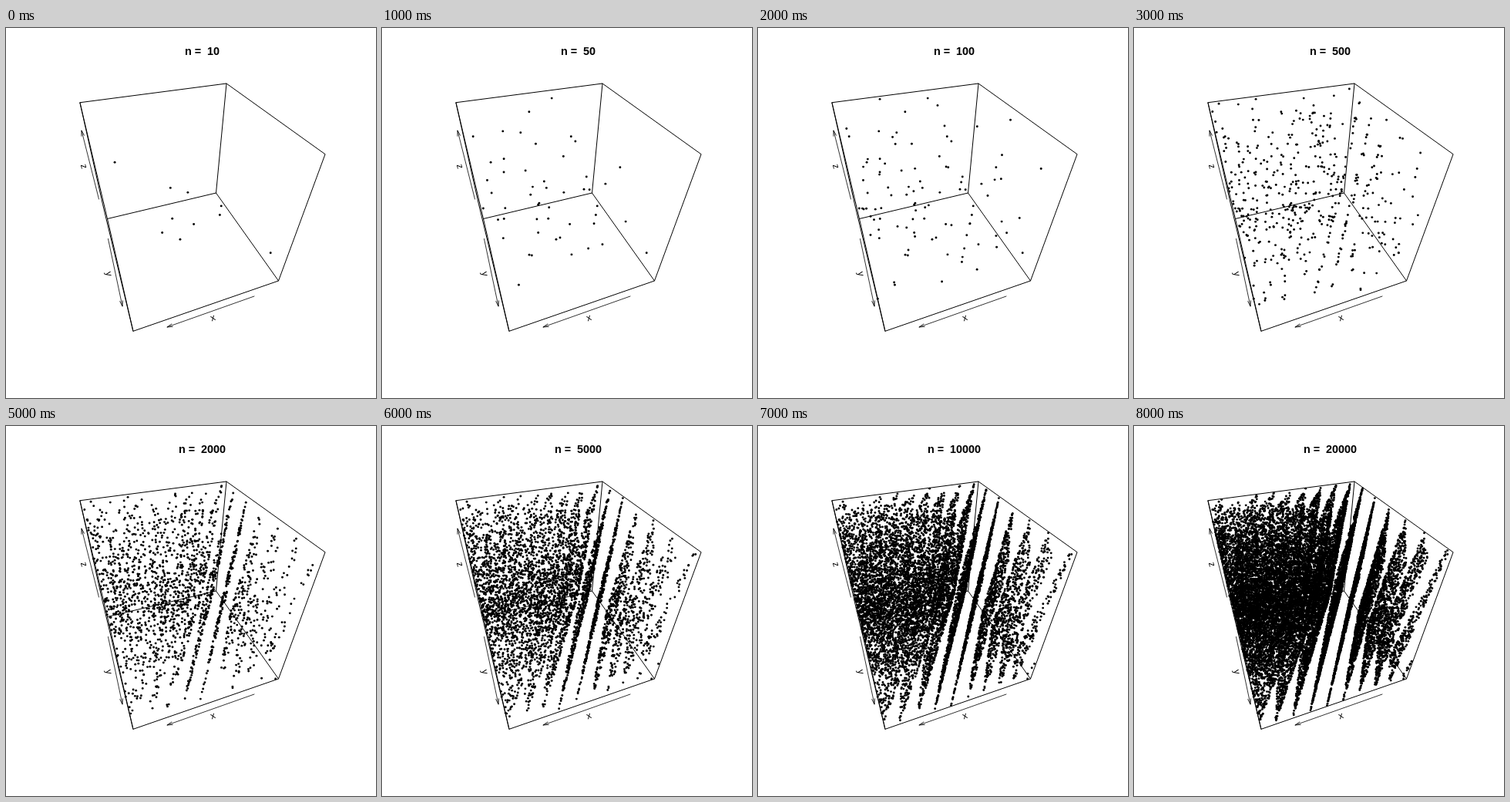
An HTML page with a canvas for the animation above (9 s loop, 480 by 480 pixels).

```html
<!DOCTYPE html>
<html lang="en">
<head>
<meta charset="utf-8">
<title>Random triples in a cube</title>
<style>
  html, body { margin: 0; width: 100%; height: 100%; overflow: hidden; background: #fff; }
  svg, canvas { position: absolute; left: 0; top: 0; width: 480px; height: 480px; }
  text { font-family: "Liberation Sans", Arial, sans-serif; text-anchor: middle; white-space: pre; }
  #title { font-size: 14.4px; font-weight: bold; }
  .label { font-size: 12px; }
  path { fill: none; stroke: #000; stroke-linejoin: round; stroke-linecap: round; }
  .arrow { stroke-width: .8; }
</style>
</head>
<body>
<svg viewBox="0 0 480 480">
  <text id="title" x="254.5" y="35"></text>
  <path id="box"/>
  <g id="axes"></g>
</svg>
<canvas id="dots" width="480" height="480"></canvas>
<script>
const STEP = 1000;
const COUNTS = [10, 50, 100, 500, 1000, 2000, 5000, 10000, 20000];
const DOT_RADIUS = 1.45;
const title = document.getElementById('title');
const ctx = document.getElementById('dots').getContext('2d');

// Perspective view of the unit cube
function project(x, y, z) {
  const w = 1 - .0975 * x - .2695 * y - .24 * z;
  return [
    (272.5 - 153.82 * x - 14.27 * y - 55.14 * z) / w,
    (214 + 9.37 * x + 25.6 * y - 159.28 * z) / w
  ];
}

// Each chain joins cube corners written as xyz bits
const CHAINS = ['000 100 110 010 000 001 101 100', '001 011 010', '101 111 110'];
const corner = bits => project(...[...bits].map(Number)).map(v => v.toFixed(2));
document.getElementById('box').setAttribute('d',
  CHAINS.map(chain => 'M' + chain.split(' ').map(corner).join('L')).join(''));

// An arrow with its label beside the middle; side picks left or right of the shaft
function axis(name, x0, y0, x1, y1, side) {
  const dx = x1 - x0, dy = y1 - y0;
  const dir = Math.atan2(dy, dx);
  const barb = a => `${x1 - 7.2 * Math.cos(dir + a)} ${y1 - 7.2 * Math.sin(dir + a)}`;
  const spread = Math.PI / 12;
  const lx = (x0 + x1) / 2 + side * 9 * Math.sin(dir);
  const ly = (y0 + y1) / 2 - side * 9 * Math.cos(dir);
  const turn = Math.atan(dy / dx) * 180 / Math.PI;
  return `<path class="arrow" d="M${x0} ${y0}L${x1} ${y1}M${barb(spread)}L${x1} ${y1}L${barb(-spread)}"/>
    <text class="label" y="3.2" transform="translate(${lx} ${ly}) rotate(${turn})">${name}</text>`;
}

document.getElementById('axes').innerHTML =
  axis('x', 322, 348, 209, 388, 1) +
  axis('y', 132.5, 273.5, 151, 361, -1) +
  axis('z', 120.5, 222, 98, 133, 1);

// RANDU with an increment: triples fall on parallel planes,
// and the increment shifts them by a quarter of their spacing
const MODULUS = 2 ** 31;
let state = 7654321;
function randu() {
  state = (65539 * state + 8192) % MODULUS;
  return state / MODULUS;
}

const points = Array.from({ length: Math.max(...COUNTS) }, () => project(randu(), randu(), randu()));

function dot([x, y]) {
  ctx.beginPath();
  ctx.arc(x, y, DOT_RADIUS, 0, 2 * Math.PI);
  ctx.fill();
}

function show(n) {
  title.textContent = `n =  ${n}`;
  ctx.clearRect(0, 0, 480, 480);
  for (let i = 0; i < n; i++) dot(points[i]);
}

const start = performance.now();
let current = -1;
function tick() {
  const stage = Math.floor((performance.now() - start) / STEP) % COUNTS.length;
  if (stage !== current) show(COUNTS[current = stage]);
  requestAnimationFrame(tick);
}
tick();
</script>
</body>
</html>
```
